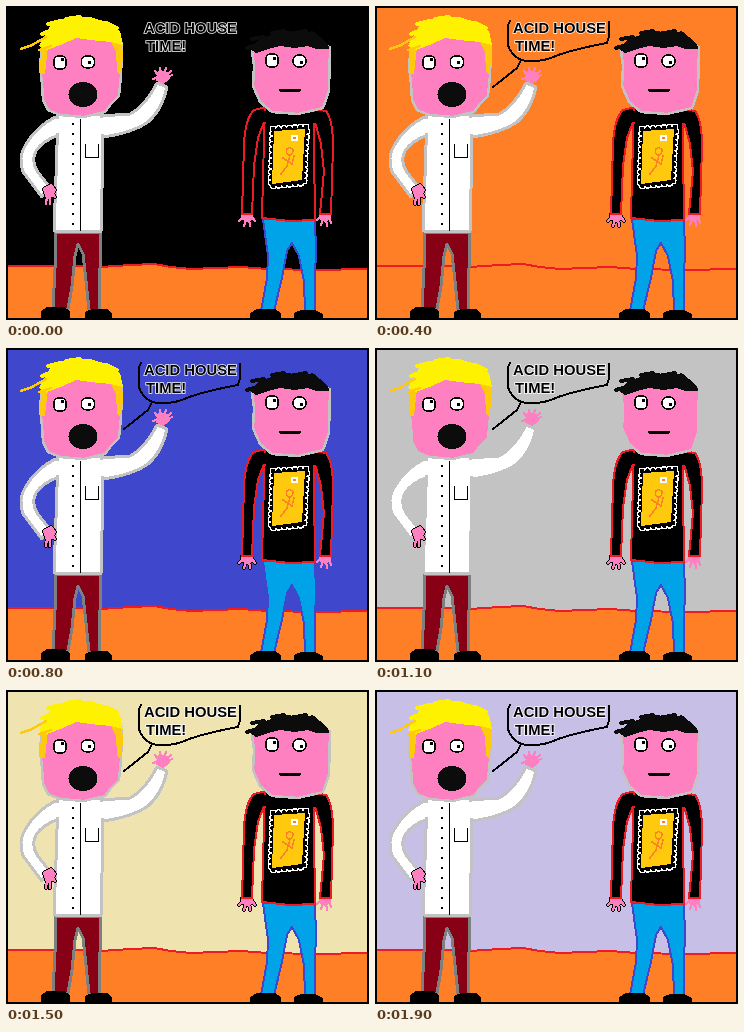
These frames come from a looping animation (363x314 px, 2000 ms). An HTML page:

```html
<!DOCTYPE html>
<html lang="en">
<head>
<meta charset="utf-8">
<title>Acid house time</title>
<style>
  html, body { margin: 0; width: 100%; height: 100%; overflow: hidden; background: #000; }
  svg { display: block; width: 363px; height: 314px; shape-rendering: crispEdges; }
  path, polyline, rect { stroke-linejoin: round; stroke-linecap: round; }
  .line { fill: none; stroke: #000; stroke-width: 2; }
  .face { fill: #ff80c0; stroke: #c3c3c3; stroke-width: 2.5; }
  .hand { stroke: #000; stroke-width: 4; }
  .hand + .hand { stroke: #ff80c0; stroke-width: 2.2; fill: #ff80c0; }
  .shirt { fill: #fff; stroke: #c3c3c3; stroke-width: 3; }
  .tee { fill: #000; stroke: #ed1c24; stroke-width: 2; }
  .eye { fill: #fff; stroke: #000; stroke-width: 1.4; }
  .dark { fill: #0c0c0c; }
  .hair { fill: none; stroke-width: 4; }
  text { font: bold 14.8px "Liberation Sans", Arial, sans-serif; }
  .halo { fill: #fff; stroke: #fff; stroke-width: 1.6; }
</style>
</head>
<body>
<svg viewBox="0 0 363 314">
  <defs>
    <path id="hip" d="M38 183L45 179L49 184L46 190L41 192ZM41 190L40 198M44 189L44 198M46 187L49 191"/>
    <path id="wave" d="M151 74L153 66L162 67L163 72L157 77ZM152 71L147 73M152 69L149 65M155 67L154 62M158 67L160 62M161 69L165 65M162 71L166 69"/>
    <path id="left" d="M236 208H245L247 212L242 215L237 213ZM237 211L233 215M240 213L238 220M243 213L244 220M246 211L249 215"/>
    <path id="right" d="M314 208H323L324 212L319 215L314 212ZM315 211L311 214M317 213L315 219M320 213L321 220M323 211L325 217"/>
    <path id="cloud" stroke-dasharray="0 5.5" d="M267 123L301 121L299 148L298 177L265 180L266 150Z"/>
  </defs>

  <rect width="363" height="314"/>
  <rect id="sky" x="2" y="2" width="359" height="310"/>
  <path fill="#ff7f27" d="M2 312V260H60L95 261L125 259L148 258L165 261L185 263L210 262L235 261L262 263L310 264L361 263V312Z"/>
  <polyline fill="none" stroke="#ed1c24" stroke-width="2" points="2,260 60,260 95,261 125,259 148,258 165,261 185,263 210,262 235,261 262,263 310,264 361,263"/>

  <!-- speech bubble -->
  <path class="line" d="M135 15L133 19V39Q135 48 146 54L142 62L118 81M146 54Q164 58 183 49Q204 42 232 37L234 30V16"/>
  <g id="speech"></g>

  <!-- man in white shirt -->
  <path fill="#880015" stroke="#7f7f7f" stroke-width="3" d="M49 226H95L94 262L93 304H83L80 275L77 248L72 238L69 250L66 280L62 303H47L49 262Z"/>
  <path d="M35 312V305L41 301H58L64 305V312ZM79 312V306L86 303H101L106 307V312Z"/>
  <path class="shirt" d="M52 110Q31 119 19 140Q12 151 17 166L36 191L43 180L31 165Q25 154 30 145Q36 135 53 129Z"/>
  <path class="shirt" d="M95 110L124 108Q139 100 151 77L161 81Q156 104 142 116Q126 127 97 131Z"/>
  <path class="shirt" d="M52 109L95 108L97 140L95 226L48 225L50 170Z"/>
  <path fill="#fff" d="M50 113H57V127H50ZM92 112H101V128H92Z"/>
  <path d="M67 117V222" stroke="#000" stroke-width="2" stroke-dasharray="2 8" style="stroke-linecap:butt"/>
  <path d="M74.500 113V225" stroke="#000"/>
  <path d="M79.500 138V151.500H92.500V138" fill="none" stroke="#000"/>
  <use href="#hip" class="hand"/><use href="#hip" class="hand"/>
  <use href="#wave" class="hand"/><use href="#wave" class="hand"/>
  <path class="face" d="M36 40L34 60L36 78L37 94L42 104L54 109L78 111L99 106L105 98L113 90L115 70L116 38L108 24L51 22Z"/>
  <path fill="#ffc90e" d="M35 40L42 40L39 68H34ZM103 32L116 34L117 52L114 68L111 66L110 46Z"/>
  <path fill="#fff200" d="M33 40L43 22L46 15L62 12L84 11L104 17L114 25L117 39L105 36L84 34L70 32L57 38L41 44Z"/>
  <path class="hair" stroke="#ffc90e" style="stroke-width:2.500" d="M15 43L26 39L40 31M33 44L45 40"/>
  <path class="hair" stroke="#fff200" d="M36 28L48 23M42 18L54 15M60 13L74 11M100 17L111 22M106 28L114 36"/>
  <rect class="eye" x="48" y="50" width="12" height="13" rx="4"/>
  <rect class="eye" x="75.500" y="50" width="13" height="12" rx="5"/>
  <path d="M55 52h3v3h-3zM82 55h3v3h-3z"/>
  <ellipse class="dark" cx="77" cy="88.500" rx="14.500" ry="12.500"/>

  <!-- man in black shirt -->
  <path fill="#00a2e8" stroke="#3f48cc" stroke-width="2" d="M257 213L309 214L310 245L309 270V305H299L298 275L293 250L286 237L281 245L276 272L268 305H255L261 272L262 250Z"/>
  <path d="M244 312V307L251 303H269L275 307V312ZM288 312V307L295 304H309L317 308V312Z"/>
  <use href="#left" class="hand"/><use href="#left" class="hand"/>
  <use href="#right" class="hand"/><use href="#right" class="hand"/>
  <path class="tee" d="M260 101L248 104Q239 113 238 138L236 208H246L248 160L252 132L258 116Z"/>
  <path class="tee" d="M308 103L320 105Q327 114 327 140L325 208H314L318 165L315 138L309 116Z"/>
  <path class="tee" d="M259 102L308 104L308 140L309 214L284 215L256 212L257 170Z"/>
  <path d="M254 105H263V116H254ZM304 106H313V117H304Z"/>
  <path class="face" d="M246 45L248 60L247 80L254 96L266 106L292 108L317 102L323 85L324 41L300 37L264 37Z"/>
  <path class="dark" d="M244 43L252 34L265 29L276 25L294 26L307 26L318 37L323 43L310 43L302 40L289 42L274 40L262 43L250 47Z"/>
  <path class="hair" stroke="#0c0c0c" d="M241 42L255 38M246 33L258 31M266 27L278 25M284 28L300 25M306 27L317 36L321 41"/>
  <rect class="eye" x="260" y="48" width="12" height="13" rx="4"/>
  <rect class="eye" x="287" y="49" width="13" height="12" rx="5"/>
  <path d="M267 51h3v3h-3zM294 55h3v3h-3z"/>
  <path class="line" style="stroke-width:3" d="M274 84H294"/>

  <!-- stamp print -->
  <use href="#cloud" fill="#fff" stroke="#fff" stroke-width="7"/>
  <use href="#cloud" fill="#000" stroke="#000" stroke-width="4.500"/>
  <path fill="#ffc90e" d="M268 125L299 123L296 174L266 178Z"/>
  <path fill="none" stroke="#ff7f27" stroke-width="1.500" d="M281 143Q284 140 287 144Q287 148 283 149Q279 147 281 143M284 149L281 160L275 168M288 150L286 158L277 152"/>
  <path fill="#fff" d="M285 129h7v6h-7z"/>
  <path fill="#ff7f27" d="M287 131h3v2h-3z"/>

  <path d="M0 0H363V314H0ZM2 2V312H361V2Z" fill-rule="evenodd"/>
</svg>
<script>
  const palette = [
    '#000000', '#7f7f7f', '#880015', '#ed1c24', '#ff7f27',
    '#fff200', '#22b14c', '#00a2e8', '#3f48cc', '#a349a4',
    '#ffffff', '#c3c3c3', '#b97a57', '#ffaec9', '#ffc90e',
    '#efe4b0', '#b5e61d', '#99d9ea', '#7092be', '#c8bfe7'
  ];
  const stepMs = 100;

  const speech = document.getElementById('speech');
  for (const style of ['halo', 'ink']) {
    ['ACID HOUSE', 'TIME!'].forEach((words, row) => {
      const line = document.createElementNS('http://www.w3.org/2000/svg', 'text');
      line.setAttribute('class', style);
      line.setAttribute('x', 138 + row * 2);
      line.setAttribute('y', 27 + row * 18);
      line.textContent = words;
      speech.append(line);
    });
  }

  // Each colour holds until the next step.
  const steps = palette.map((fill, i) => ({ fill, offset: i / palette.length, easing: 'steps(1, end)' }));
  steps.push({ fill: palette.at(-1), offset: 1 });
  document.getElementById('sky').animate(steps, { duration: palette.length * stepMs, iterations: Infinity });
</script>
</body>
</html>
```
